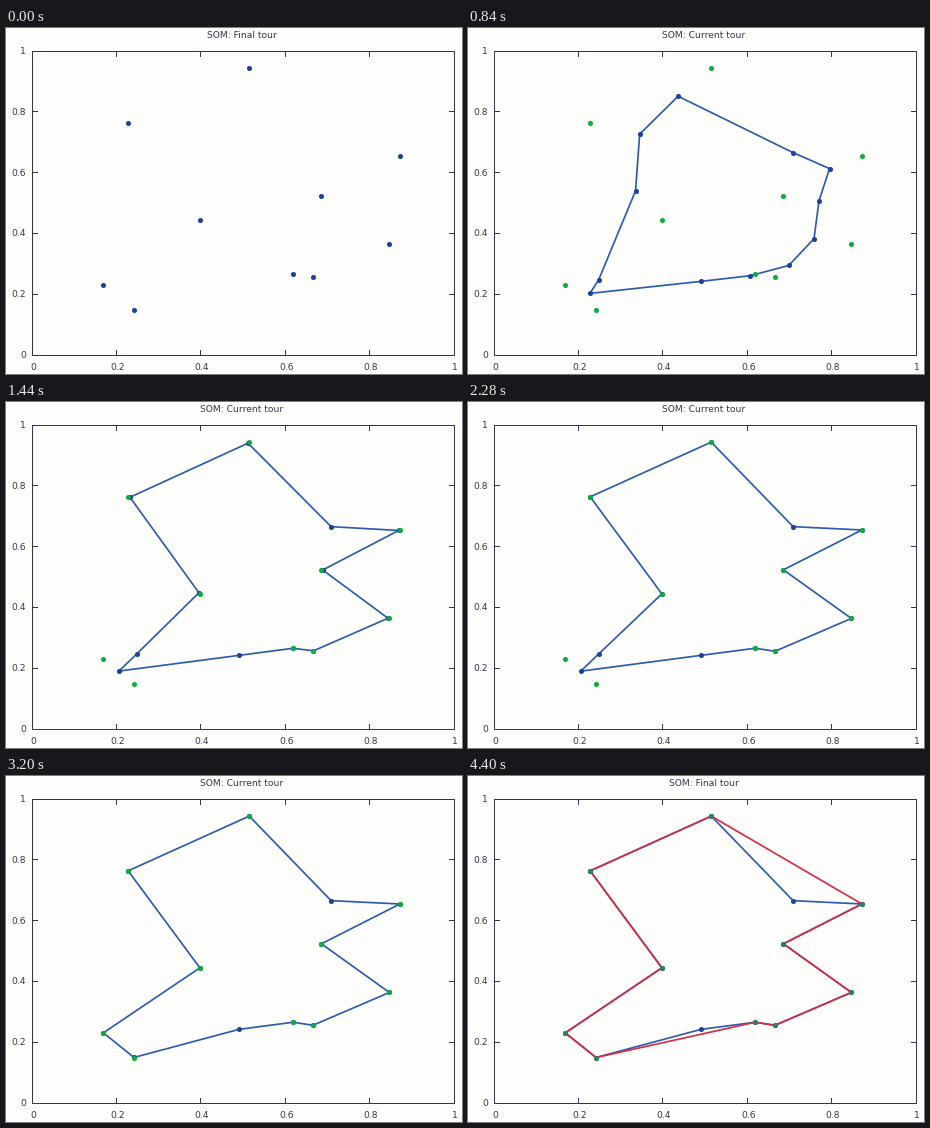
Animation of 456x346 px, one loop 5.04 s. Source, as a matplotlib script:

```python
import numpy as np
import matplotlib.pyplot as plt
from matplotlib.animation import FuncAnimation

W, H, DPI = 456, 346, 64
PX = 72 / DPI  # points per pixel
FRAMES, INTERVAL = 126, 40
FINAL = 110    # result appears
OPEN = 21      # neighbourhood stops shrinking, nodes chase single cities
SPLIT = 57     # a node that held two cities gives one away
COUNT = 12     # nodes on the ring
WIDE, NARROW = 6, 0.88  # neighbourhood widths

INK, BLUE, NODE = "#35354e", "#2c5bb0", "#1c419f"
GREEN, DARK_GREEN, RED = "#10ab3e", "#27875a", "#da2a45"
LEFT, RIGHT, TOP, BOTTOM = 25.5, 447.5, 22.5, 326.5

# Cities in tour order and the node that wins each of them
cities = np.array([
    (.516, .942), (.873, .653), (.687, .522), (.848, .362), (.667, .254),
    (.620, .264), (.243, .148), (.170, .229), (.399, .443), (.229, .762)])
winner = np.array([0, 2, 3, 4, 5, 6, 8, 8, 10, 11])
IDLE = [1, 7, 9]


def attract(width):
    """Each node as the mean of all cities, weighted by ring distance."""
    gap = np.abs(np.arange(COUNT)[:, None] - winner)
    gap = np.minimum(gap, COUNT - gap)
    weight = np.exp(-gap ** 2 / (2 * width ** 2))
    return weight @ cities / weight.sum(axis=1, keepdims=True)


def mix(a, b, t):
    return a + (b - a) * t


def decay(n):
    """Remaining share of the distance after n learning steps."""
    return np.exp(-0.184 * n - 0.0024 * n * n)


rest = attract(0.2)
rest[IDLE] = (.710, .664), mix(rest[6], rest[8], .31), mix(rest[8], rest[10], .22)


def nodes(frame):
    t = min(1, (frame - 1) / (OPEN - 1))
    pos = attract(WIDE * (NARROW / WIDE) ** t)
    pos[IDLE] = mix(pos[IDLE], rest[IDLE], t)
    if frame > OPEN:
        pos = mix(rest, pos, decay(frame - OPEN))
    if frame > SPLIT:
        pos[8:10] = mix(cities[6:8], rest[8:10], decay(frame - SPLIT))
    return pos


def to_px(points):
    x, y = np.reshape(points, (-1, 2)).T
    return mix(LEFT, RIGHT, x), mix(BOTTOM, TOP, y)


def closed(points):
    return to_px(np.vstack([points, points[:1]]))


fig = plt.figure(figsize=(W / DPI, H / DPI), dpi=DPI, facecolor="#fdfdfb")
ax = fig.add_axes([0, 0, 1, 1])
ax.set(xlim=(0, W), ylim=(H, 0))
ax.axis("off")


def label(x, y, text, ha="center"):
    return ax.text(x, y, text, ha=ha, va="baseline", color=INK,
                   family="DejaVu Sans", size=9.1 * PX)


def stroke(x, y, color=INK, width=1.0, z=1):
    return ax.plot(x, y, color=color, lw=width * PX, zorder=z)[0]


def dots(color, z):
    return ax.plot([], [], "o", color=color, ms=5.1 * PX, mew=0, zorder=z)[0]


stroke([LEFT, RIGHT, RIGHT, LEFT, LEFT], [TOP, TOP, BOTTOM, BOTTOM, TOP])
for v in np.linspace(0, 1, 6):
    x, y = mix(LEFT, RIGHT, v), mix(BOTTOM, TOP, v)
    if 0 < v < 1:
        for edge, step in ((TOP, 5), (BOTTOM, -5)):
            stroke([x, x], [edge, edge + step])
        for edge, step in ((LEFT, 5), (RIGHT, -5)):
            stroke([edge, edge + step], [y, y])
    label(x + 1.5, 342, f"{v:g}")
    label(20, y + 3.5, f"{v:g}", "right")

title = label(235.7, 10, "")
path = stroke([], [], BLUE, 1.7, 2)
tour = stroke([], [], RED, 1.7, 3)
node_dots = dots(NODE, 4)
city_dots = dots(GREEN, 5)
city_dots.set_data(*to_px(cities))


def update(frame):
    start, final = frame == 0, frame >= FINAL
    pos = np.empty((0, 2)) if start else nodes(frame)
    title.set_text("SOM: Final tour" if start or final else "SOM: Current tour")
    path.set_data(*closed(pos))
    node_dots.set_data(*to_px(pos))
    tour.set_data(*(closed(cities) if final else ([], [])))
    city_dots.set_color(NODE if start else DARK_GREEN if final else GREEN)
    return title, path, tour, node_dots, city_dots


anim = FuncAnimation(fig, update, frames=FRAMES, interval=INTERVAL,
                     repeat=True, repeat_delay=0)
plt.show()
```
